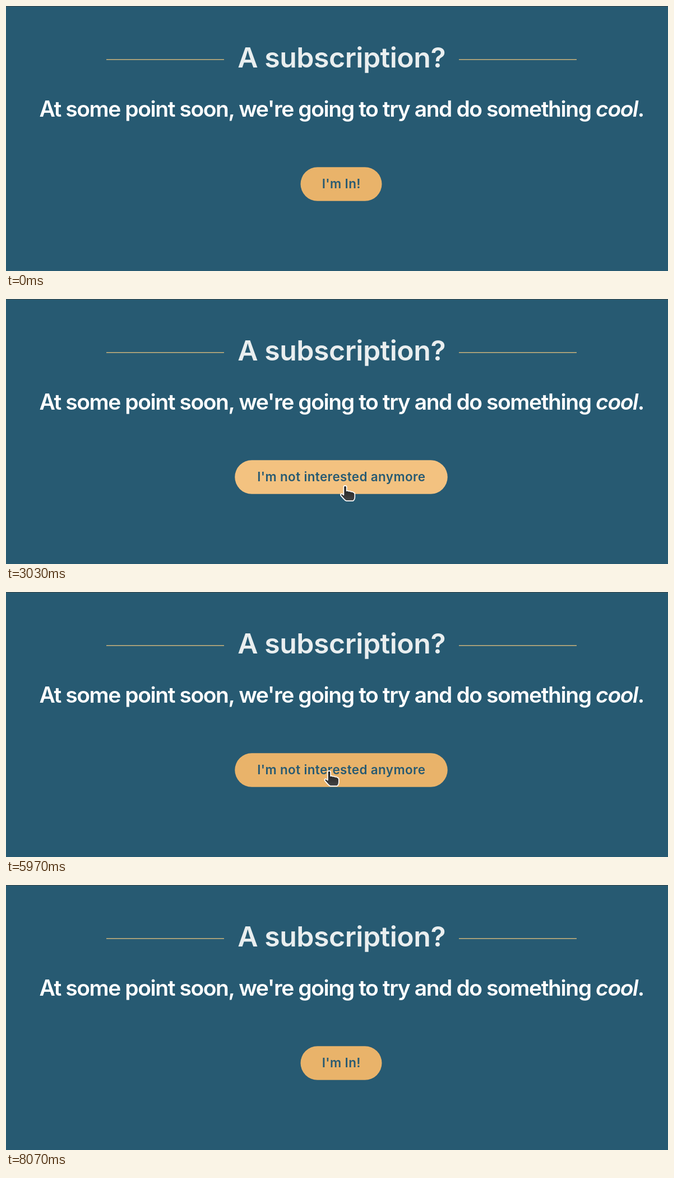
Recreate the animation shown at these times as an HTML page. Size 1181x474 px, loop 8.56 s.

```html
<!DOCTYPE html>
<html lang="en">
<head>
<meta charset="utf-8">
<title>A subscription?</title>
<style>
  html, body { margin: 0; width: 100%; height: 100%; overflow: hidden; background: #275a72; }
  svg { display: block; width: 100%; height: 100%; }
  text {
    font-family: Poppins, Inter, "Open Sans", sans-serif;
    font-weight: 600;
    font-optical-sizing: none;
    text-anchor: middle;
  }
  .title { font-size: 50px; letter-spacing: -0.5px; fill: #e9eeef; }
  .lead { font-size: 39px; letter-spacing: -1.43px; fill: #fff; }
  .label { font-size: 22.4px; letter-spacing: 0.4px; fill: #275a72; }
  .cursor { fill: url(#ink); stroke: #fff; stroke-width: 1.7; stroke-linejoin: round; }
</style>
</head>
<body>
<svg viewBox="0 0 1181 474">
  <defs>
    <linearGradient id="ink" x2="0" y2="1">
      <stop stop-color="#1c1c1c"/>
      <stop offset="1" stop-color="#454545"/>
    </linearGradient>
  </defs>
  <rect width="1181" height="474" fill="#275a72"/>
  <rect width="1181" height="1" fill="#33444a"/>
  <path d="M179 95.75H389M808 95.75H1018" stroke="#cdb47c" stroke-width="1.5"/>
  <text class="title" x="598.7" y="110">A subscription?</text>
  <text class="lead" x="598.7" y="198">At some point soon, we're going to try and do something <tspan font-style="italic">cool</tspan>.</text>
  <rect id="pill" y="288.25" height="60.5" rx="30.25"/>
  <text id="label" class="label" x="598.3" y="325.5"></text>
  <g id="pointer">
    <path id="arrow" class="cursor" d="M1 1.5V25L6.4 20.4L10.2 28.4Q11.5 30.3 13.4 29.3Q15.3 28.2 14.4 26.2L10.8 18.9H18.6Z"/>
    <path id="hand" class="cursor" d="M-2.6 3.4Q-2.4 .9 0 .9Q2.4 .9 2.6 3.4V10.2Q4.6 9.3 6.6 10.9Q8.8 10 10.8 11.8Q13 11 14.6 12.8Q17.4 13 17.3 16.4V21.5Q17 26.6 13.8 28.2H2.6Q-.4 27.4-2.4 24.6L-7.8 18.4Q-8.7 16.2-6.8 15.4Q-5 15-2.6 17.6Z"/>
  </g>
</svg>
<script>
const LOOP = 8560, CENTER = 598;
const FADE = 240, HOVER_DELAY = 100, FADE_STEPS = 24;
const el = id => document.getElementById(id);

const clicks = [1570, 3770, 5970, 7500];
const labels = [
  { text: "I'm In!", width: 145 },
  { text: "I'm not interested anymore", width: 379.5 }
];

// Pointer moves: start, end, destination. The pointer rests in between.
const home = { x: 990, y: 480 };
const moves = [
  { start: 370, end: 830, x: 671, y: 362 },
  { start: 1000, end: 1270, x: 612, y: 335 },
  { start: 1770, end: 1870, x: 640, y: 490 },
  { start: 2470, end: 3030, x: 605, y: 333 },
  { start: 3800, end: 4080, x: 640, y: 490 },
  { start: 4460, end: 4470, x: 655, y: 440 },
  { start: 4570, end: 4830, x: 620, y: 335 },
  { start: 4970, end: 5300, x: 436, y: 358 },
  { start: 5400, end: 5770, x: 576.5, y: 319 },
  { start: 6070, end: 6200, x: 560, y: 377 },
  { start: 6470, end: 6770, x: 543, y: 325 },
  { start: 7740, end: 7750, ...home }
];

const mix = (a, b, u) => a + (b - a) * u;
const smooth = u => u * u * (3 - 2 * u);

function pointerAt(t) {
  let { x, y } = home;
  for (const move of moves) {
    if (t <= move.start) break;
    const u = smooth(Math.min(1, (t - move.start) / (move.end - move.start)));
    x = mix(x, move.x, u);
    y = mix(y, move.y, u);
  }
  return { x, y };
}

const labelAt = t => labels[clicks.filter(time => time <= t).length % 2];

function isInside(t) {
  const { x, y } = pointerAt(t);
  return Math.abs(x - CENTER) < labelAt(t).width / 2 && y > 288 && y < 349;
}

// Linear fade: the share of the last FADE ms spent hovering the current button.
function glowAt(t) {
  const lastClick = Math.max(-Infinity, ...clicks.filter(time => time <= t));
  let hovered = 0;
  for (let i = 0; i < FADE_STEPS; i++) {
    const past = t - FADE * i / FADE_STEPS;
    if (past > lastClick + HOVER_DELAY && isInside(past)) hovered++;
  }
  return hovered / FADE_STEPS;
}

function render(t) {
  const { text, width } = labelAt(t);
  const glow = glowAt(t);
  const rgb = [mix(233, 252, glow), mix(179, 208, glow), mix(106, 150, glow)];
  el("pill").setAttribute("x", CENTER - width / 2);
  el("pill").setAttribute("width", width);
  el("pill").setAttribute("fill", `rgb(${rgb.map(Math.round)})`);
  el("label").textContent = text;

  const { x, y } = pointerAt(t);
  const inside = isInside(t);
  el("pointer").setAttribute("transform", `translate(${x} ${y})`);
  el("hand").style.display = inside ? "" : "none";
  el("arrow").style.display = inside ? "none" : "";
}

const start = performance.now();
function tick() {
  render((performance.now() - start) % LOOP);
  requestAnimationFrame(tick);
}
tick();
</script>
</body>
</html>
```
